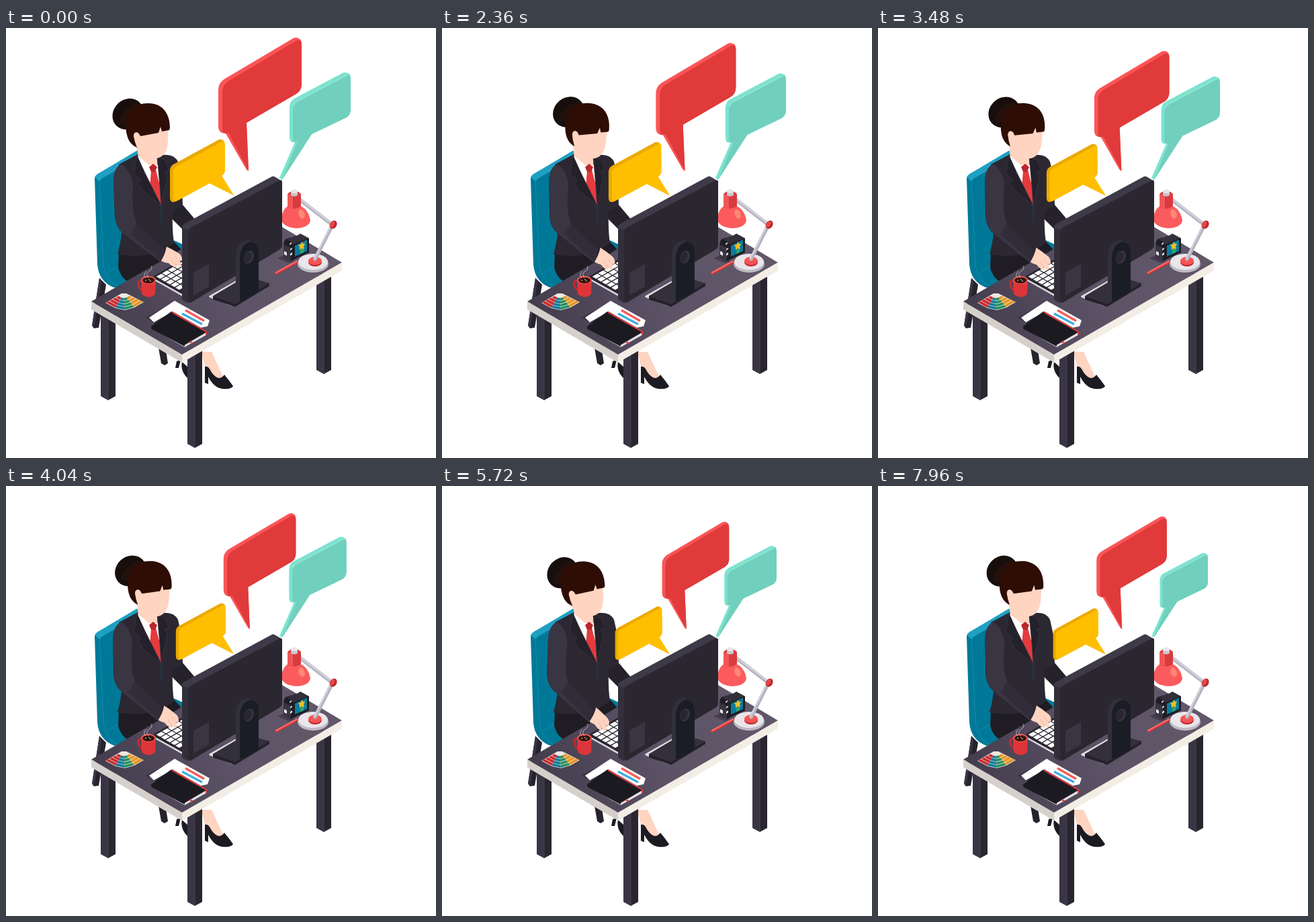
Animation, 640 px wide and 640 px high, one loop 8000 ms. Source, as an HTML page:

```html
<!DOCTYPE html>
<html lang="en">
<head>
<meta charset="utf-8">
<title>Office chat</title>
<style>
html,body{margin:0;width:100%;height:100%;overflow:hidden;background:#fff}
svg{display:block;width:100vw;height:100vh}
</style>
</head>
<body>
<svg viewBox="0 0 640 640">
<defs>
  <linearGradient id="wood" gradientUnits="userSpaceOnUse" x1="150" y1="440" x2="440" y2="330">
    <stop offset="0" stop-color="#453e4e"/><stop offset=".6" stop-color="#5c5367"/><stop offset="1" stop-color="#615769"/>
  </linearGradient>
  <g id="leg"><path fill="#3a3545" d="M0 -24H11V126L0 120Z"/><path fill="#292630" d="M11 -24H22V120L11 126Z"/><path stroke="#555060" stroke-width=".6" d="M11 -24V126"/></g>
</defs>

<g id="chair">
  <path fill="#26232c" d="M139 372L128 443L131 447L138 446L149 382Z"/>
  <path fill="#3a3545" d="M139 372L128 443L131 447L142 379Z"/>
  <path fill="#26232c" d="M227 476L231 499L236 502L241 499L238 480Z"/>
  <path fill="#007998" d="M132 225Q132 220 137 217L194 184L210 230L240 312L252 317L263 322L262 333L176 389L160 386Q138 377 136 352Z"/>
  <path fill="#1ea0c3" d="M132 222Q133 219 137 217L194 183L200 182V191L143 224L139 228Z"/>
  <path fill="none" stroke="#138aa9" d="M139 228L145 353Q148 376 170 388M150 365L168 354"/>
</g>

<g id="feet">
  <path fill="#ffd4c1" d="M262 482H306L324 521L313 525L297 507L291 484L277 499Z"/>
  <path fill="#1d1b22" d="M254 496L260 494L257 506H252ZM262 497Q259 510 270 521L280 522V500L270 504Z"/>
  <path fill="#1d1b22" d="M296 504Q301 502 305 511Q316 528 325 516Q331 523 338 533Q336 538 322 537Q309 535 301 519L301 530L296 528Z"/>
</g>

<g id="body">
  <path fill="#1f1c24" d="M168 335L250 318L262 331L184 379Q170 372 167 356Z"/>
  <path fill="#25222b" d="M246 248L262 262L284 288L264 301L243 280Z"/>
  <path fill="#2b2832" d="M168 203L196 188L233 189Q250 187 256 199L262 226L263 265L248 272Q247 300 250 320Q218 346 166 337Q176 300 172 270Z"/>
  <path fill="#ffd4c1" d="M195 174L224 186L226 207L213 209L197 195Z"/>
  <path fill="#fff" d="M196 190L213 204L226 204L231 264L207 222Z"/>
  <path fill="#e53b3d" d="M216 212L223 211L230 238L231 264L214 238Z"/>
  <path fill="#bd252c" d="M213 207L219 202L225 207L222 214L216 214Z"/>
  <path fill="#24212a" stroke="#3b3743" stroke-width=".8" d="M195 190L207 216L231 264L205 243L197 232L201 226L190 217Z"/>
  <path fill="#24212a" stroke="#3b3743" stroke-width=".8" d="M225 191L238 198L242 211L236 214L240 221L231 264L228 221Z"/>
  <path stroke="#0e4b61" d="M231 264V290"/>
</g>

<g id="head">
  <ellipse cx="181.500" cy="128" rx="24.500" ry="21.500" fill="#180e0c" transform="rotate(-45 181.500 128)"/>
  <path fill="#21120e" d="M168 142Q170 122 194 111L200 118L182 145Z"/>
  <path fill="#ffd4c1" d="M190 158L204 150L241 146L241 168Q240 192 223 194Q205 195 198 186Q192 178 190 158Z"/>
  <path fill="#2d0d04" d="M178 145C176 125 191 112 212 112C232 112 244 126 244 149L243 152L232 154L230 147L227 156L200 161Q194 151 190 160Q191 169 195 178C182 172 179 160 178 145Z"/>
  <path fill="#ffd4c1" d="M191 165Q188 156 194 155Q200 156 201 168Z"/>
</g>

<use href="#leg" x="141" y="428"/><use href="#leg" x="462" y="389"/><use href="#leg" x="270" y="499"/>

<g id="desk">
  <path fill="url(#wood)" d="M127 407L365 269L500 349L262 487Z"/>
  <path fill="#d5d0cb" d="M127 407L262 486V498L127 419Z"/>
  <path fill="#f2eee5" d="M262 486L500 349V361L262 498Z"/>
  <path fill="#dcd9df" d="M216 373L264 400V396L219 370Z"/>
  <path fill="#2a2731" d="M217 371L290 328L325 349L264 397Z"/>
  <g id="keys" transform="matrix(.866 -.5 .866 .5 222 370)" fill="#fff"></g>
</g>

<g id="swatches"></g>

<g id="cup">
  <path fill="none" stroke="#c9282d" stroke-width="3" d="M204 378Q196 373 197 383Q199 391 206 392"/>
  <path fill="#dd3539" d="M201 375H223L222 396Q213 405 202 396Z"/>
  <ellipse cx="212" cy="375" rx="11" ry="6" fill="#f15a58"/><ellipse cx="212" cy="375.500" rx="9" ry="4.600" fill="#35150e"/>
  <path fill="none" stroke="#fff" stroke-width=".8" opacity=".7" d="M212 372Q207 366 213 362T216 354M208 372Q203 367 209 362"/>
  <path fill="none" stroke="#e5d5c9" d="M207 375l2 1M212 374l2 1M214 377l2-1"/>
</g>

<g id="papers">
  <path fill="#3d3647" d="M207 431L251 408L285 440L230 444Z"/>
  <path fill="#fff" d="M213 431L251 406L303 435L300 444L290 446L248 422L220 438Z"/>
  <path fill="none" stroke="#f45d5d" stroke-width="3.500" d="M267 420L295 436"/>
  <path fill="none" stroke="#42aee0" stroke-width="3.500" d="M262 425L292 441"/>
  <path fill="#e5e1e5" d="M218 448L266 472L298 453V457L266 475Z"/>
  <path fill="#1c1a21" d="M216 444L246 422L299 452L266 471L266 474L218 449Q215 447 216 444Z"/>
  <path fill="none" stroke="#e53b3d" stroke-width="2" d="M247 423L298 452V457M273 467L278 469"/>
</g>

<g id="pencil" fill="none" stroke-linecap="round"><path stroke="#d43639" stroke-width="4" d="M402 365L434 348"/><path stroke="#ff6a66" stroke-width="2" d="M402 364L433 347"/></g>

<g id="camera">
  <path fill="#463e50" d="M404 343L414 338L430 347L421 350Z"/>
  <path fill="#1f1d25" d="M413 322L415 315L422 312L427 314L438 306L451 313V334L424 347L413 342Z"/>
  <path fill="#383440" d="M413 322L424 327V347L413 342Z"/><path fill="#34303b" d="M418 314L438 307L450 313L428 322Z"/>
  <path fill="#0b7c9c" d="M430 324L448 315V332L430 340Z"/><path fill="#32a46c" d="M438 330L443 327V334L438 336Z"/>
  <path fill="#f7bd22" d="M440 318l2 3 3 0-2 4 1 4-4-1-3 2 0-4-2-3 4-1Z"/>
  <path fill="#e9e7ec" d="M414 332l4 2v5l-4-2ZM422 321l3-2v2l-3 2ZM423 329l3-2v2l-3 2ZM423 336l3-2v3l-3 2Z"/>
</g>

<g id="lamp">
  <ellipse cx="457" cy="351" rx="23" ry="13" fill="#bebac4"/><ellipse cx="457" cy="348" rx="22" ry="12" fill="#e9e6eb"/>
  <ellipse cx="460" cy="349" rx="10" ry="6" fill="#c52f34"/><ellipse cx="460" cy="346.500" rx="10" ry="6" fill="#f45553"/>
  <g fill="none" stroke-linecap="round"><path stroke="#b5b3c0" stroke-width="5.500" d="M460 344L486 293L438 256"/><path stroke="#d3d2dc" stroke-width="2.500" d="M459 343L484 293M484 290L438 255"/></g>
  <ellipse cx="487.500" cy="292.500" rx="5" ry="6.500" fill="#bd282e" transform="rotate(30 487 292)"/><ellipse cx="486" cy="292" rx="3" ry="5" fill="#e74747" transform="rotate(30 486 292)"/>
  <path fill="#fc5b5d" d="M410 285Q411 264 429 262Q449 265 453 286C452 302 412 302 410 285Z"/>
  <ellipse cx="440" cy="277" rx="4.500" ry="7" fill="#ff8875" transform="rotate(-20 440 277)"/>
  <path fill="#d93b3e" d="M419 247Q429 237 439 247V265Q429 272 419 266Z"/><path fill="#ef5758" d="M419 247L427 250V269L419 266Z"/>
  <path fill="#c9c6d0" d="M424 243H434V249Q429 252 424 249Z"/><ellipse cx="429" cy="243" rx="5" ry="3" fill="#e8e5ea"/>
</g>

<g id="arm">
  <g id="hand">
    <path fill="#ffd4c1" d="M229 346L236 324Q247 329 255 334Q263 338 262 346L259 347L261 354Q257 357 252 351L255 356Q249 357 242 350Q235 349 229 346Z"/>
    <path fill="none" stroke="#e9b5a2" stroke-width=".8" d="M246 344L253 352M251 340L259 348"/>
  </g>
  <path fill="#2b2832" d="M178 203Q190 208 192 232L195 282L239 325Q237 337 230 348L174 305Q164 298 162 280L160 232Q159 208 172 203Z"/>
  <path fill="#3a3543" d="M172 203Q188 213 189 238Q186 273 195 292L234 328Q234 339 230 348L176 307Q165 300 163 281L160 232Q159 208 172 203Z"/>
  <path fill="#2d2a34" d="M195 290L234 327L231 347L185 307Z" opacity=".65"/>
</g>

<g id="yellow">
  <path fill="#eca900" d="M244 213Q244 206 249 203L317 166Q322 165 325 169L326 213Q325 217 321 220L339 249L303 231L253 258Q244 262 244 252Z"/>
  <path fill="#ffbf00" d="M249 214Q249 209 254 206L322 169Q326 168 326 174V212Q325 217 321 220L339 249L303 231L255 257Q249 260 249 254Z"/>
</g>
<g id="red">
  <path fill="#fb5557" d="M316 92Q316 82 325 76L428 15Q434 13 438 17Q440 19 440 24V83Q440 93 432 98L358 141L361 213L358 211L327 157Q316 157 316 146Z"/>
  <path fill="#e03a3a" d="M322 95Q322 85 331 79L432 19Q440 16 440 26V83Q440 93 432 98L358 141L361 213L331 156Q322 159 322 149Z"/>
</g>
<g id="teal">
  <path fill="#7ce3cf" d="M422 118Q422 109 429 105L503 66Q508 66 512 69L513 75V121Q513 129 507 133L455 158L411 226L407 223L430 170Q422 172 422 162Z"/>
  <path fill="#70cfbd" d="M427 121Q427 113 433 109L508 70Q513 69 513 76V121Q513 129 507 133L455 158L411 226L434 169Q427 172 427 164Z"/>
  <path fill="none" stroke="#b5eee3" stroke-width=".8" d="M428 116Q429 112 434 109L508 70"/>
</g>

<g id="monitor">
  <path fill="#dedbe2" d="M302 399L348 373L352 375L308 401L338 414L334 413L303 401Z"/>
  <path fill="#24212a" d="M308 399L357 370L392 380V384L341 415L308 404Z"/>
  <path fill="#34303b" d="M308 399L357 370L392 380L341 411Z"/>
  <path fill="#3f3a48" d="M262 297Q262 293 266 291L396 221Q398 220 401 222L411 228V326L276 408L269 409L262 404Z"/>
  <path fill="#2a2731" d="M271 303Q271 299 275 297L407 227Q411 225 411 230V323Q411 327 407 330L276 408Q271 410 271 404Z"/>
  <path fill="#332f3a" d="M262 297L271 301V409L262 404Z"/>
  <path fill="#3a3542" d="M279 364L302 351V385L279 398Z"/>
  <path fill="#32303a" d="M342 404V341Q342 317 361 316L371 319L352 408Z"/>
  <path fill="#1b1d26" d="M348 408V342Q349 322 364 318Q376 319 376 335V391Z"/>
  <ellipse cx="361.500" cy="341" rx="7" ry="10" fill="#37343e" transform="rotate(25 361.500 341)"/>
  <ellipse cx="360" cy="341" rx="5" ry="8" fill="#292630" transform="rotate(25 360 341)"/>
</g>
</svg>
<script>
const $ = id => document.getElementById(id);
const LOOP = 8000, HOLD = 112;

function add(parent, d, fill) {
  const path = document.createElementNS('http://www.w3.org/2000/svg', 'path');
  path.setAttribute('d', d);
  if (fill) path.setAttribute('fill', fill);
  parent.append(path);
}

for (let row = 0; row < 5; row++)
  for (let col = 0; col < 7; col++)
    add($('keys'), `M${col * 10 + 1} ${row * 8.2 + 1}h8.600v6.600h-8.600z`);

// Colour cards are banded wedges that share one pivot.
const rim = [[148, 409], [163, 417], [177, 420], [191, 416], [205, 408]];
const toRim = (i, k) => `${175 + (rim[i][0] - 175) * k} ${395 + (rim[i][1] - 395) * k}`;
add($('swatches'), `M172 395H179L${[...rim].reverse().join('L')}Z`, '#eee8df');
['#c92b30', '#0b7d9c', '#258e5c', '#e79522'].forEach((color, i) => {
  for (let k = .28; k < .9; k += .18)
    add($('swatches'), `M${toRim(i, k)}L${toRim(i, k + .15)}L${toRim(i + 1, k + .15)}L${toRim(i + 1, k)}Z`, color);
});

// Poses are 1120 ms apart, starting at 120 ms.
const poses = {
  red: [1, .997, .96, .9, .839, .804, .814, .844],
  yellow: [1, .984, .958, .926, .884, .853, .832, .821],
  teal: [1, 1, .99, .961, .913, .854, .815, .786],
  head: [0, .4, 5.3, 4.7, .9, -1.7, -.6, 2.5],
  arm: [0, 1, 1.5, 1.6, 1.9, 4.4, 4.5, 1.4]
};
const pivots = { red: [375, 213], yellow: [337, 257], teal: [410, 223] };

function pose(values, time) {
  const x = Math.max(0, Math.min(values.length - 1, (time - 120) / 1120));
  const i = Math.min(values.length - 2, Math.floor(x)), u = x - i;
  const at = n => values[Math.max(0, Math.min(values.length - 1, n))];
  const [a, b, c, d] = [at(i - 1), at(i), at(i + 1), at(i + 2)];
  return b + u / 2 * (c - a + u * (2 * a - 5 * b + 4 * c - d + u * (3 * (b - c) + d - a)));
}

function rotate(id, angle, x, y) {
  $(id).setAttribute('transform', `rotate(${angle} ${x} ${y})`);
}

function draw(now) {
  const t = now % LOOP;
  const held = Math.floor((t - 8) / HOLD) * HOLD + 8;
  for (const [id, [x, y]] of Object.entries(pivots))
    $(id).setAttribute('transform', `translate(${x} ${y}) scale(${pose(poses[id], held)}) translate(${-x} ${-y})`);
  const arm = pose(poses.arm, held);
  rotate('head', pose(poses.head, held), 217, 201);
  rotate('arm', arm, 180, 203);
  rotate('hand', 5 * Math.sqrt(Math.max(0, arm)), 234, 335);
}

function tick() {
  draw(performance.now());
  requestAnimationFrame(tick);
}
tick();
</script>
</body>
</html>
```
